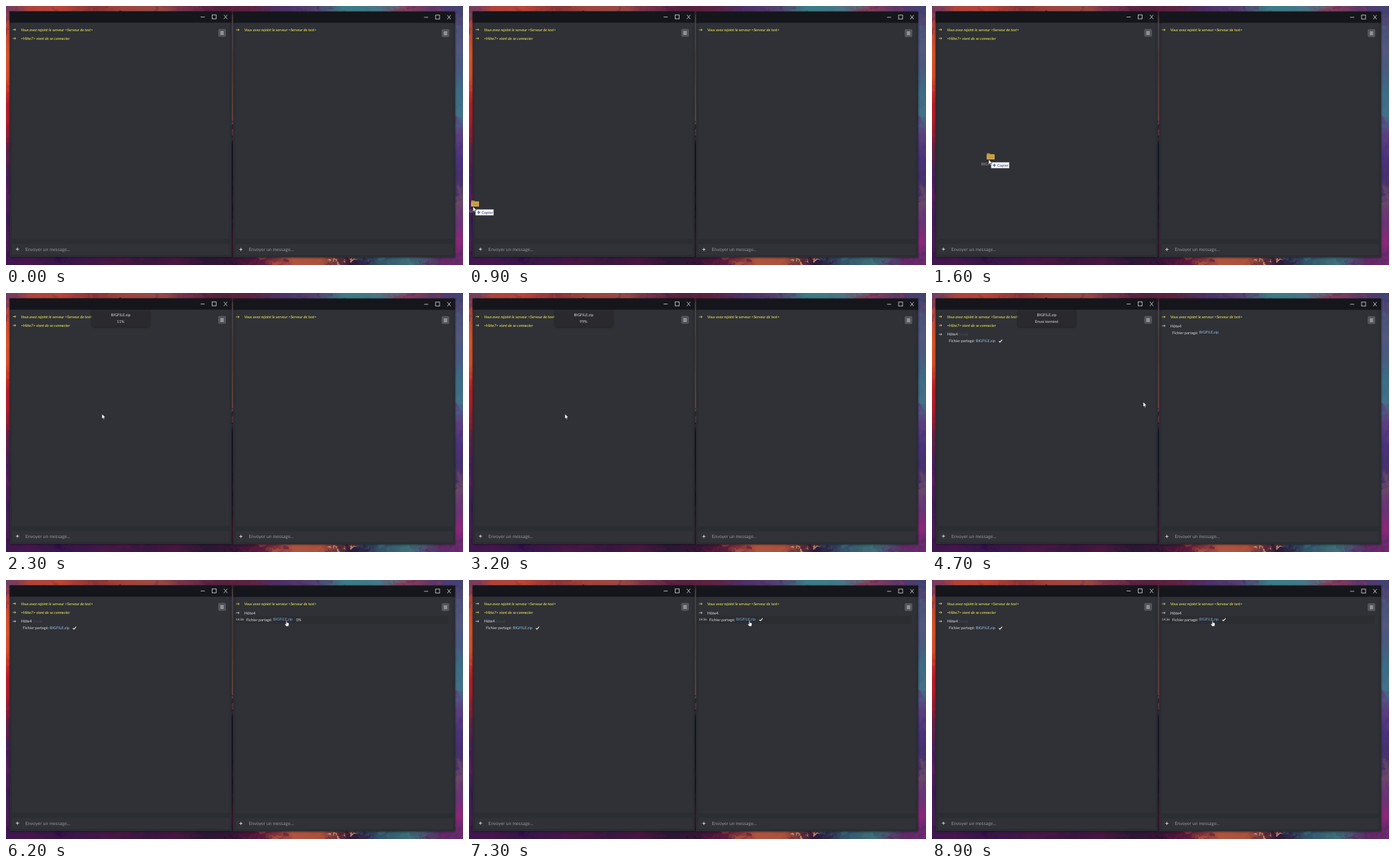
An HTML page for the animation above (9 s loop, 686 px wide and 390 px high).

```html
<!DOCTYPE html>
<html lang="fr">
<head>
<meta charset="utf-8">
<title>Partage de fichier</title>
<style>
html, body { margin: 0; width: 100%; height: 100%; overflow: hidden; background: #35204a; }
svg { display: block; width: 686px; height: 390px; }
text { font-family: Lato, "Open Sans", sans-serif; font-size: 5.75px; fill: #dddee0; text-rendering: geometricPrecision; white-space: pre; }
.info { font-style: italic; font-weight: 500; fill: #ebe858; }
.link { fill: #9bc3e8; }
.mid { text-anchor: middle; }
</style>
</head>
<body>
<svg id="stage" viewBox="0 0 686 390" xmlns="http://www.w3.org/2000/svg">
  <defs>
    <filter id="shade" x="-10%" y="-10%" width="120%" height="120%">
      <feDropShadow dx="0" dy="0.6" stdDeviation="1.6" flood-color="#000" flood-opacity=".55"/>
    </filter>
    <filter id="brush" x="0" y="0" width="686" height="390" filterUnits="userSpaceOnUse">
      <feTurbulence type="fractalNoise" baseFrequency=".09" numOctaves="3" seed="4"/>
      <feDisplacementMap in="SourceGraphic" scale="14" xChannelSelector="R" yChannelSelector="G"/>
    </filter>
    <path id="arrow" d="M0 0H4.6M3 -1.5L4.7 0L3 1.5" fill="none" stroke-width=".75"/>
    <path id="check" d="M-2.3 .2L-.8 1.8L2.5 -1.9" fill="none" stroke="#eeeff0" stroke-width="1.15"/>
    <g id="window">
      <rect x="5.5" y="8" width="333.3" height="370" fill="#2b2d32" filter="url(#shade)"/>
      <rect x="5.5" y="8" width="333.3" height="17.2" fill="#15161b"/>
      <rect x="9" y="25.2" width="326.5" height="325.5" rx="1.5" fill="#2f3136"/>
      <rect x="9" y="358.3" width="326.5" height="16.4" rx="2" fill="#303237"/>
      <g fill="none" stroke="#c9cacd" stroke-width=".9">
        <path d="M292.2 16.6H298.3M327 13.2L332.2 19.7M332.2 13.2L327 19.7"/>
        <rect x="309.5" y="13.3" width="6" height="6"/>
      </g>
      <rect x="319.1" y="35.1" width="10.4" height="10.7" rx="1" fill="#505359" stroke="#686b71" stroke-width=".6"/>
      <path d="M321.7 38.7H326.9M321.7 40.7H326.9M321.7 42.7H326.9" stroke="#e3e4e6" stroke-width=".85"/>
      <path d="M14.9 366.2H19.5M17.2 363.9V368.5" stroke="#d4d5d7" stroke-width="1"/>
      <text x="29" y="368.9" style="font-size:7px;fill:#92959b">Envoyer un message...</text>
      <use href="#arrow" x="10" y="35.6" stroke="#ebe858"/>
      <text class="info" x="22.4" y="37.5">Vous avez rejoint le serveur &lt;Serveur de test&gt;</text>
    </g>
  </defs>

  <g id="wallpaper" filter="url(#brush)">
    <rect width="686" height="390" fill="#3a1f4a"/>
  </g>

  <use href="#window"/>
  <use href="#arrow" x="10" y="48.8" stroke="#ebe858"/>
  <text class="info" x="22.4" y="50.8">&lt;Hôte7&gt; vient de se connecter</text>
  <g id="sent">
    <use href="#arrow" x="10" y="62.2" stroke="#dddee0"/>
    <text x="22.4" y="64.3" style="font-size:6px">Hôte4<tspan dx="1.6" fill="#4d5056" font-size="5.4">(vous)</tspan></text>
    <text x="25.2" y="74.4">Fichier partagé:</text>
    <text class="link" x="65.8" y="74.3">BIGFILE.zip</text>
    <use href="#check" x="102.8" y="72.3"/>
  </g>
  <g id="popup">
    <rect x="129" y="25.2" width="86.5" height="25.3" rx="1.5" fill="#292b2f" filter="url(#shade)"/>
    <text class="mid" x="172.2" y="35.3">BIGFILE.zip</text>
    <text class="mid" id="upload" x="172" y="45.4"></text>
  </g>

  <use href="#window" x="335.4" y=".4"/>
  <g id="received">
    <rect id="hover" x="343" y="53.8" width="321.5" height="12" fill="#2b2d31"/>
    <text id="clock" x="345" y="61.4" style="font-size:4.7px">14:36</text>
    <use href="#arrow" x="345.4" y="49.4" stroke="#dddee0"/>
    <text x="357.8" y="51.5" style="font-size:6px">Hôte4</text>
    <text x="360.6" y="61.5">Fichier partagé:</text>
    <text class="link" id="link" x="401.1" y="61.4">BIGFILE.zip</text>
    <text id="download" x="435.5" y="61.8"></text>
    <use id="done" href="#check" x="438.2" y="59.7"/>
  </g>

  <g id="drag">
    <path d="M-2.8 -9.3H1.7L2.8 -8.1H9V0H-2.8Z" fill="#b98c2e"/>
    <path d="M-2.8 -6.7H9V0H-2.8Z" fill="#d0a94c"/>
    <path d="M-1 -4.2H7.4M-1 -2.2H7.4" stroke="#a88745" stroke-width=".8"/>
    <text class="mid" x="3.6" y="8.6" style="fill:#a5a6a9">BIGFILE.zip</text>
    <rect x="3.9" y="4.4" width="27" height="8.7" fill="#f7f8fb" stroke="#a9abb2" stroke-width=".4"/>
    <path d="M6.2 8.8H11M8.6 6.4V11.2" stroke="#244a9a" stroke-width="1"/>
    <text x="13" y="10.8" style="fill:#27376f">Copier</text>
  </g>
  <path id="pointer" d="M0 0V7.6L1.7 6L2.8 8.8L4 8.3L2.9 5.6H5.3Z" fill="#fff" stroke="#111" stroke-width=".5"/>
  <path id="hand" d="M-.7 .3Q0 -.6 .7 .3V3L3 3.6Q4 4 3.8 5.3L3.2 8.7H-.6L-2.5 5.7Q-2.6 4.6 -1.6 4.9L-.7 5.7Z" fill="#fff" stroke="#111" stroke-width=".5"/>
</svg>
<script>
const NS = 'http://www.w3.org/2000/svg';
const LOOP = 9000;
const $ = id => document.getElementById(id);

function add(parent, tag, attrs) {
  const node = document.createElementNS(NS, tag);
  for (const key in attrs) node.setAttribute(key, attrs[key]);
  return parent.appendChild(node);
}

let seed = 41;
function random() {
  seed = (seed * 16807) % 2147483647;
  return seed / 2147483647;
}

// A painted edge: blended tones with daubs on top, roughened by the brush filter.
function paintStrip(name, x, y, width, height, tones) {
  const colors = tones.split(' ').map(tone => '#' + tone);
  const vertical = height > width;
  const gradient = add(document.querySelector('defs'), 'linearGradient', {
    id: name, x2: vertical ? 0 : 1, y2: vertical ? 1 : 0
  });
  colors.forEach((color, i) => add(gradient, 'stop', {
    offset: i / (colors.length - 1), 'stop-color': color
  }));
  const wall = $('wallpaper');
  add(wall, 'rect', { x, y, width, height, fill: `url(#${name})` });
  const length = Math.max(width, height);
  for (let i = 0; i < length / 4; i++) {
    const at = random();
    const slot = Math.round(at * (colors.length - 1) + (random() - .5) * 1.6);
    add(wall, 'ellipse', {
      cx: x + (vertical ? random() : at) * width,
      cy: y + (vertical ? at : random()) * height,
      rx: 1 + random() * (vertical ? 4 : 8),
      ry: 1 + random() * (vertical ? 8 : 3),
      fill: colors[Math.max(0, Math.min(colors.length - 1, slot))],
      opacity: .3 + random() * .4
    });
  }
}

paintStrip('gap', 328, 0, 24, 390, '6a3a48 62585c 5e4a48 6e4a40 7a5044 8c5058 17162c 15122a 32142e 1c1230 481a34 3c1630');
paintStrip('left', -12, 0, 24, 390, '6a3a62 c44a36 d8552c d8502a c02028 b01a2a 6a2044 48205a 5a2060 3e1a58 4a1c58 30124a');
paintStrip('right', 666, 0, 32, 390, '52406e 4c5078 52587e 4a5a80 3c6c86 447088 5a4080 4a347c 44306e 6a4a68 6a3478 8a2878 4a2a6a');
paintStrip('top', -10, -10, 706, 22, '5a3a70 b0443c b84438 8a3438 a0443c 9a4a44 74304a 54203e 5e2440 4c3068 54406e 3c7c84 467888 8a3c58 54386c 3e4674');
paintStrip('bottom', -10, 372, 706, 28, '3c1650 46184e 341248 3e1448 4a1646 381440 481840 2c1234 341236 5e1c3c b05440 a8503c 2c1838 33526a 3f7078 5a2a64 7a2874');
for (let i = 0; i < 9; i++) {
  add($('wallpaper'), 'circle', {
    cx: 484 + random() * 40, cy: 382 + random() * 6, r: .8 + random() * 1.4, fill: '#d9a27c', opacity: .75
  });
}

// Cursor stops: time, x, y
const route = [
  [900, 6, 302], [1200, 30, 286], [1600, 85, 231], [2000, 125, 202], [2200, 144, 182],
  [4000, 144, 182], [4700, 317, 164], [5200, 371, 112], [5700, 421, 61], [LOOP, 421, 61]
];

function cursorAt(time) {
  const next = Math.max(1, route.findIndex(stop => stop[0] > time));
  const [t0, x0, y0] = route[next - 1];
  const [t1, x1, y1] = route[next];
  const part = Math.max(0, Math.min(1, (time - t0) / (t1 - t0)));
  return [x0 + (x1 - x0) * part, y0 + (y1 - y0) * part];
}

function percent(time, start, end) {
  return Math.round(99 * Math.max(0, Math.min(1, (time - start) / (end - start)))) + '%';
}

function show(id, visible) {
  $(id).setAttribute('visibility', visible ? 'inherit' : 'hidden');
}

function render(time) {
  const [x, y] = cursorAt(time);
  const hovering = time >= 5700;
  for (const id of ['drag', 'pointer', 'hand']) $(id).setAttribute('transform', `translate(${x} ${y})`);
  show('drag', time >= 900 && time < 2200);
  show('pointer', time >= 900 && !hovering);
  show('hand', hovering);

  show('popup', time >= 2200 && time < 5400);
  $('upload').textContent = time < 3500 ? percent(time, 2200, 3100) : 'Envoi terminé';
  show('sent', time >= 3500);
  show('received', time >= 3500);

  show('hover', hovering);
  show('clock', hovering);
  $('link').style.fill = hovering ? '#7fa6d6' : '';
  $('download').textContent = time >= 6000 && time < 7100 ? percent(time, 6300, 7000) : '';
  show('done', time >= 7100);
}

function tick(now) {
  render(Math.floor(now % LOOP / 100) * 100);
  requestAnimationFrame(tick);
}

render(0);
requestAnimationFrame(tick);
</script>
</body>
</html>
```
